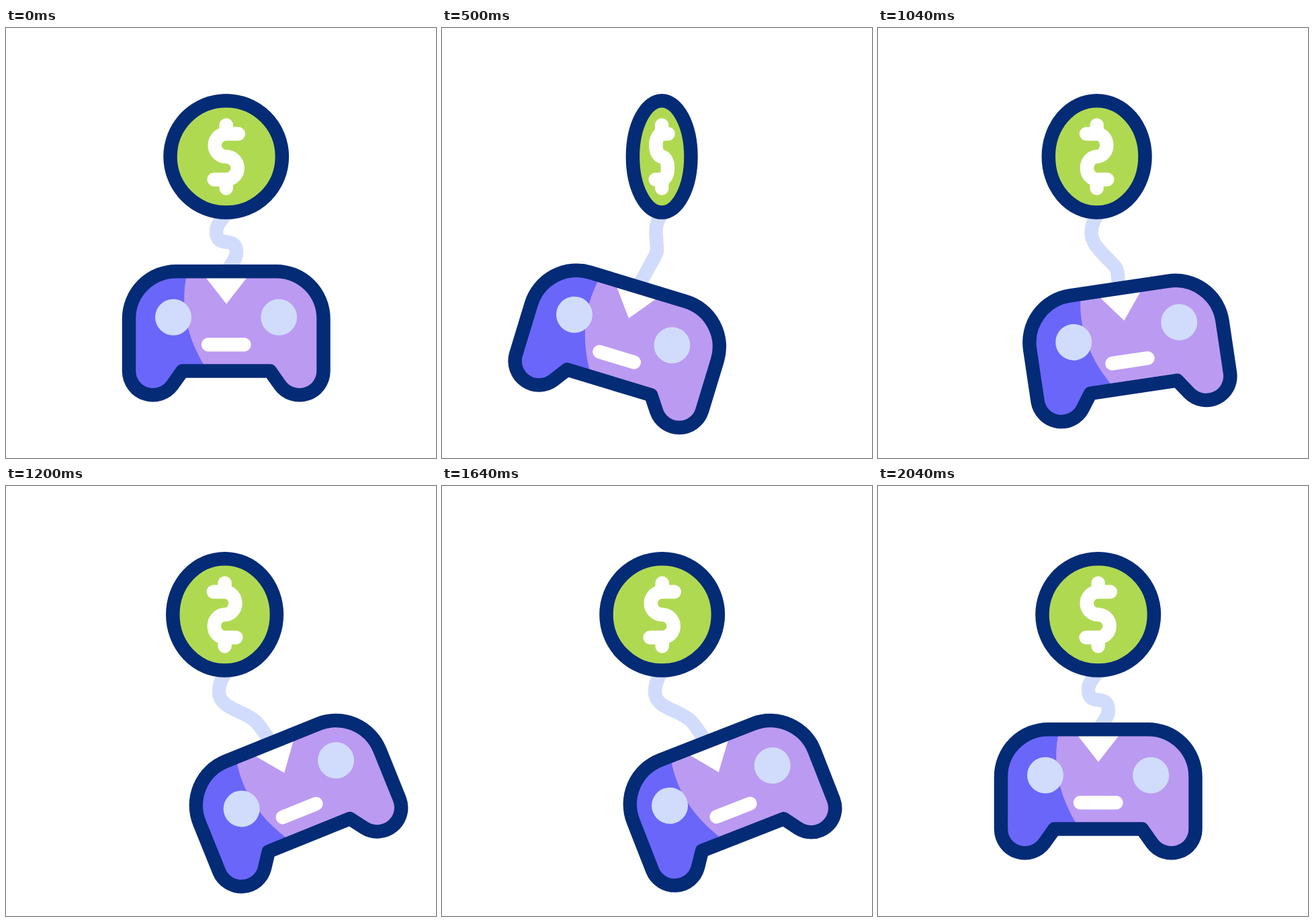
Recreate the animation shown at these times as an HTML page. Size 640x640 px, loop 2220 ms.

```html
<!DOCTYPE html>
<html>
<head>
<meta charset="utf-8">
<style>
  html, body { margin: 0; width: 100%; height: 100%; overflow: hidden; background: #fff; }
  svg { display: block; }
  .line { fill: none; stroke-width: 20.5; stroke-linecap: round; stroke-linejoin: round; }
  .navy { stroke: #042b76; }
  .white { stroke: #fff; }
  #coin * { vector-effect: non-scaling-stroke; }
</style>
</head>
<body>
<svg width="640" height="640">
  <defs>
    <path id="shell" d="M253.5 362.2H402A70.5 70.5 0 0 1 472.5 432.7V511A35.7 35.7 0 0 1 408 531.7L393 510.5H262.5L247.5 531.7A35.7 35.7 0 0 1 183 511V432.7A70.5 70.5 0 0 1 253.5 362.2Z"/>
    <clipPath id="inside"><use href="#shell"/></clipPath>
  </defs>

  <path id="cord" class="line" stroke="#d1dcfd"/>

  <!-- Controller, with its origin midway between the grips -->
  <g id="pad">
    <g transform="translate(-327.7 -511)">
      <use href="#shell" fill="#bb9af2"/>
      <path clip-path="url(#inside)" fill="#6a66f9" d="M270 362C260 405 264 455 300 510V560H170V350Z"/>
      <path fill="#fff" d="M290 362H366L328 410.7Z"/>
      <use href="#shell" class="line navy"/>
      <path class="line white" d="M301 471.2H354.5"/>
      <g fill="#d1dcfd">
        <circle id="left" cx="249" cy="430.5" r="27"/>
        <circle id="right" cx="406.2" cy="430.5" r="27"/>
      </g>
    </g>
  </g>

  <g id="coin">
    <circle r="83.2" fill="#b0d952"/>
    <circle r="83.2" class="line navy"/>
    <path class="line white" d="M18.1 -34H0A17 17 0 0 0 0 0A17 17 0 0 1 0 34H-18.1M0 -47V-34M0 34V47"/>
  </g>
</svg>
<script>
const LOOP = 2220, STEP = 400;
const clamp = x => Math.max(0, Math.min(1, x));
const ease = x => (x = clamp(x), x * x * (3 - 2 * x));
const mix = (a, b, e) => a.map((v, i) => v + (b[i] - v) * e);
const place = (id, transform) =>
  document.getElementById(id).setAttribute('transform', transform);

// Each pose: pad x, y, angle; cord's upper bend x, y; lower bend x, y and its direction
const rest = [327.7, 511, 0, 313, 303, 343, 334, 0, 27];
const tiltLeft = [248.5, 527.8, 16.9, 318.5, 303, 320, 332, 0, 10];
const tiltRight = [451.5, 520, -22, 317, 306, 371, 350, 19, 17];
const poses = [rest, tiltLeft, tiltLeft, tiltRight, tiltRight, rest];
const bows = { 0: [3.4, 4.5], 2: [0, 13.2], 4: [1, -1.3] };

// Thumb stick pushes, one letter per step
const push = { C: [0, 0], L: [-7, 0], R: [7, 0], U: [0, -8.2], D: [0, 6] };
const sticks = { left: 'CCUDLC', right: 'CLRUCC' };

function draw(now) {
  const t = now % LOOP;
  const step = Math.min(4, Math.floor(t / STEP));
  const e = ease(t / STEP - step);

  const [px, py, angle, ax, ay, bx, by, dx, dy] = mix(poses[step], poses[step + 1], e);
  const [bowX, bowY] = (bows[step] || [0, 0]).map(v => v * 4 * e * (1 - e));
  const x = px + bowX, y = py + bowY, low = by + bowY;
  place('pad', `translate(${x} ${y}) rotate(${angle})`);
  for (const id in sticks) {
    const [from, to] = sticks[id].slice(step);
    place(id, `translate(${mix(push[from], push[to], e)})`);
  }

  // The cord ends at the middle of the controller's top edge
  const a = angle * Math.PI / 180;
  const end = [x + 147 * Math.sin(a), y - 147 * Math.cos(a)];
  const cord = [
    321, 286, ax, ay - 11, ax, ay,
    ax, ay + Math.hypot(dx, dy), bx - dx, low - dy, bx, low,
    bx + dx * .4, low + dy * .4, ...mix(end, [bx, low], .55), ...end
  ];
  document.getElementById('cord').setAttribute('d', `M327 277C${cord}`);

  // The coin turns almost fully over, then back
  const turn = ease((t - 182) / 988) - ease((t - 1172) / 428);
  const width = 1 - 1.955 * turn;
  place('coin', `translate(${327.7 - 2.15 * turn} 191.4) scale(${width || .001} 1)`);
}

const start = performance.now();
function frame() {
  draw(performance.now() - start);
  requestAnimationFrame(frame);
}
draw(0);
requestAnimationFrame(frame);
</script>
</body>
</html>
```
